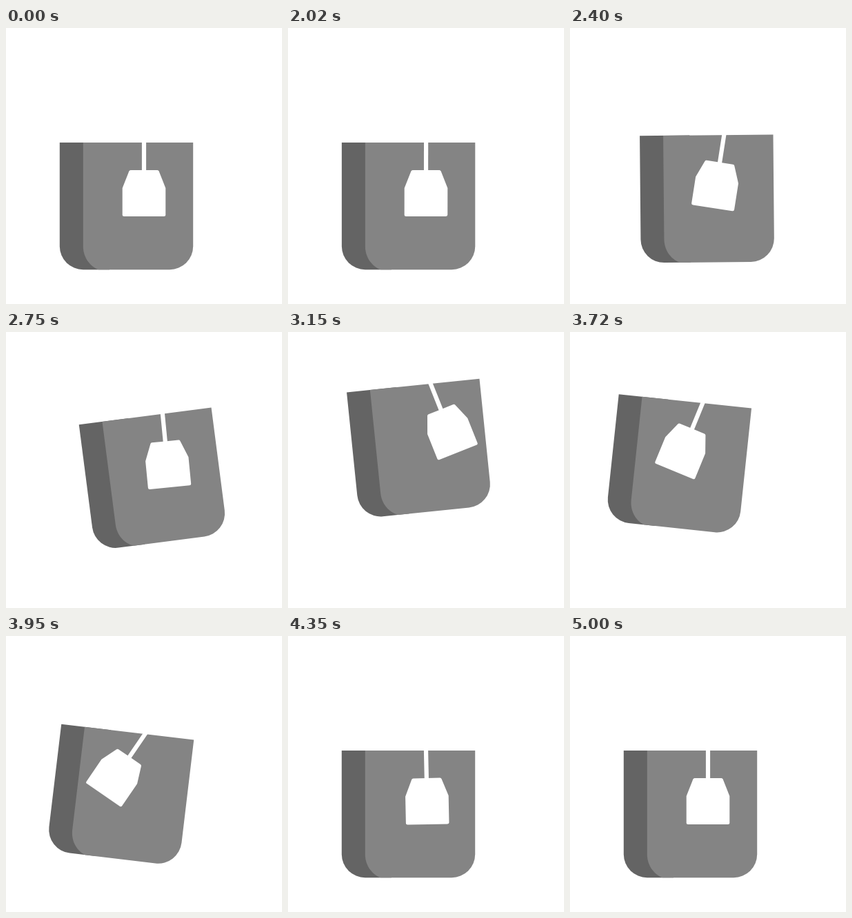
An HTML page with a canvas that plays this animation: 400x400 px, repeating every 5.2 s.

```html
<!DOCTYPE html>
<html lang="en">
<head>
<meta charset="utf-8">
<title>Tea cup</title>
<style>
  html, body { margin: 0; width: 100%; height: 100%; overflow: hidden; background: #fff; }
  canvas { display: block; width: 400px; height: 400px; }
</style>
</head>
<body>
<canvas id="stage" width="400" height="400"></canvas>
<script>
const ctx = document.getElementById('stage').getContext('2d');
const LOOP = 5200;
const CENTER = { x: 174.5, y: 258 };
const HOOK = { x: 200, y: 166 };

// Turning points only; each move between two of them eases in and out.
const shiftX = [{ t: 2000, v: 0 }, { t: 2700, v: 39.3 }, { t: 3720, v: -17.3 }, { t: 4200, v: 0 }];
const shiftY = [{ t: 2000, v: 0 }, { t: 3340, v: -96, skew: 1.27 }, { t: 4250, v: 0, skew: 1.12 }];
const tilt = [{ t: 2310, v: 0 }, { t: 2880, v: -8.4 }, { t: 3900, v: 7.2 }, { t: 4240, v: 0 }];
const swing = [{ t: 2000, v: 0 }, { t: 2370, v: 9 }, { t: 3160, v: -21.8 },
  { t: 3970, v: 34.5 }, { t: 4560, v: -15 }, { t: 5000, v: 0 }];

const ease = u => (1 - Math.cos(Math.PI * u)) / 2;

function valueAt(keys, t) {
  const i = keys.findIndex(k => k.t > t);
  if (i === 0) return keys[0].v;
  if (i < 0) return keys[keys.length - 1].v;
  const a = keys[i - 1], b = keys[i];
  const u = (t - a.t) / (b.t - a.t);
  return a.v + (b.v - a.v) * ease(u ** (b.skew || 1));
}

function turn(p, deg) {
  ctx.translate(p.x, p.y);
  ctx.rotate(deg * Math.PI / 180);
  ctx.translate(-p.x, -p.y);
}

function drawCup() {
  const l = 77.8, r = 271.2, top = 166, bottom = 350.2, rad = 34;
  const edge = l + rad;
  ctx.fillStyle = '#646464';
  ctx.beginPath();
  ctx.moveTo(l, top);
  ctx.lineTo(150, top);
  ctx.lineTo(150, bottom);
  ctx.arcTo(l, bottom, l, top, rad);
  ctx.closePath();
  ctx.fill();

  ctx.fillStyle = '#848484';
  ctx.beginPath();
  ctx.moveTo(edge, top);
  ctx.lineTo(r, top);
  ctx.arcTo(r, bottom, l, bottom, rad);
  ctx.lineTo(134, bottom);
  ctx.bezierCurveTo(121, 345, edge, 332, edge, bottom - rad);
  ctx.closePath();
  ctx.fill();
}

function drawTag() {
  const l = 168.7, r = 231.3, top = 206, shoulder = 232, bottom = 273, rad = 2.5;
  ctx.fillStyle = '#fff';
  ctx.fillRect(HOOK.x - 3.1, HOOK.y - 10, 6.2, 52);
  ctx.beginPath();
  ctx.moveTo(HOOK.x, top);
  ctx.arcTo(221, top, r, shoulder, rad);
  ctx.lineTo(r, shoulder);
  ctx.arcTo(r, bottom, l, bottom, rad);
  ctx.arcTo(l, bottom, l, shoulder, rad);
  ctx.lineTo(l, shoulder);
  ctx.arcTo(179, top, HOOK.x, top, rad);
  ctx.closePath();
  ctx.fill();
}

function draw(t) {
  const angle = valueAt(tilt, t);
  ctx.fillStyle = '#fff';
  ctx.fillRect(0, 0, 400, 400);
  ctx.save();
  ctx.translate(valueAt(shiftX, t), valueAt(shiftY, t));
  turn(CENTER, angle);
  drawCup();
  turn(HOOK, valueAt(swing, t) - angle);
  drawTag();
  ctx.restore();
}

const start = performance.now();
function tick() {
  draw((performance.now() - start) % LOOP);
  requestAnimationFrame(tick);
}
tick();
</script>
</body>
</html>
```
